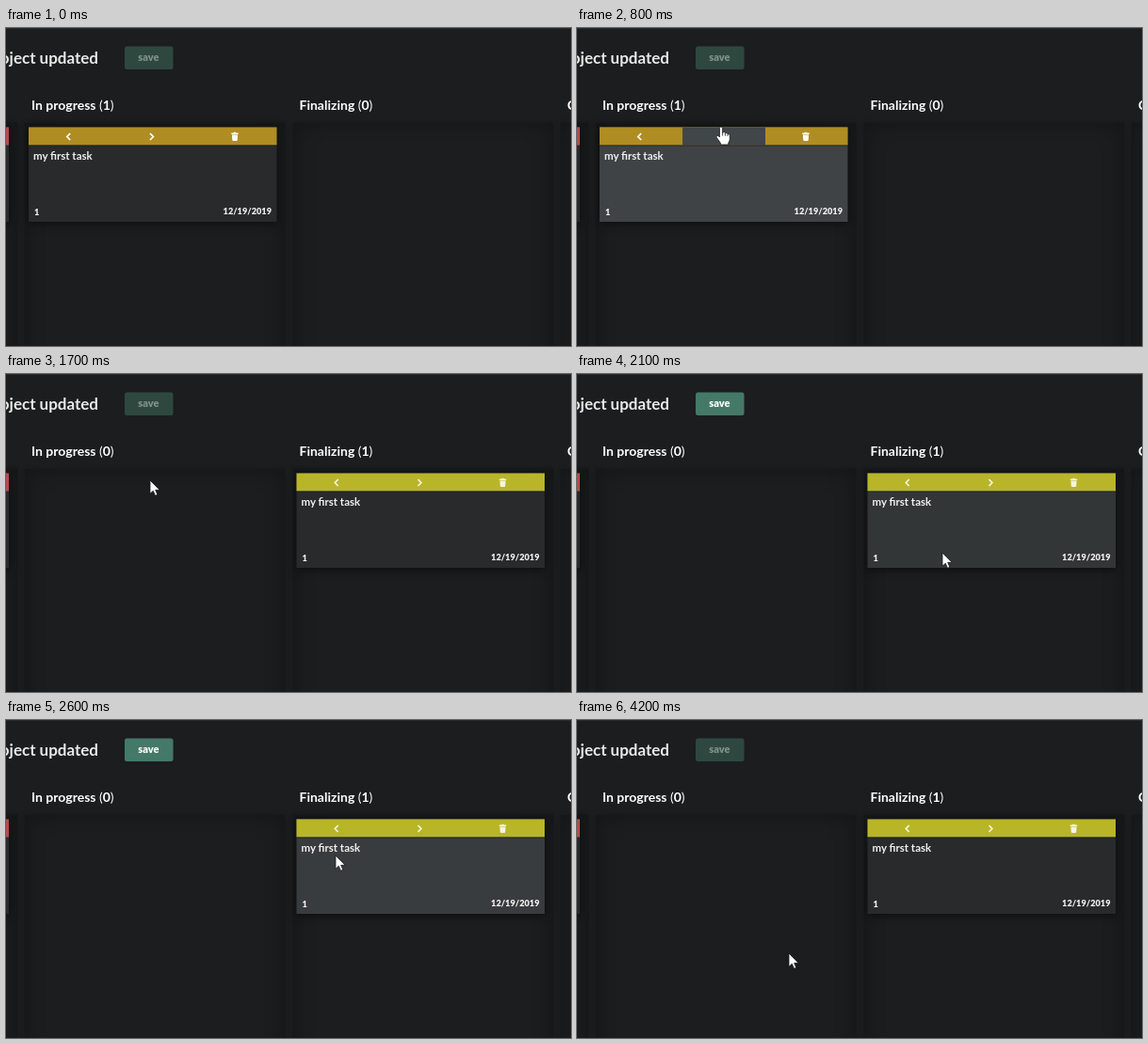
Write an HTML page that moves like this. It is 600 by 338 pixels and loops after 5000 ms.

```html
<!DOCTYPE html>
<html lang="en">
<head>
<meta charset="utf-8">
<title>Task board</title>
<style>
html, body { margin: 0; width: 100%; height: 100%; overflow: hidden; background: #1c1d1e; }
.stage { position: relative; width: 600px; height: 338px; overflow: hidden; border-top: 1px solid #292a2c; box-sizing: border-box; }
.column { position: absolute; top: 100px; width: 276px; height: 300px; background: #1c1d1e; box-shadow: inset 0 0 22px rgba(0, 0, 0, .32), 0 0 4px rgba(0, 0, 0, .25); }
svg { position: absolute; left: 0; top: -1px; }
text { font: 700 14px Lato, sans-serif; fill: #fff; }
.title { font-size: 17px; fill: #e9e9e9; }
.task { font-size: 11.5px; fill: #f0f0f0; }
.small { font-size: 9.2px; font-weight: 900; fill: #f0f0f0; }
.thin { font-weight: 400; }
.body { fill: #292a2b; filter: drop-shadow(0 2px 5px rgba(0, 0, 0, .55)); }
.chevron { fill: none; stroke: #fff; stroke-width: 1.7; }

/* One loop is 5 s, so 2% is one 100 ms step. */
.before, .after, .hover, .arrow, .hand, .pointer, .save, .label, .card .body {
  animation: 5s step-end infinite;
}
.before { animation-name: leave; }
.after { animation-name: arrive; }
.first .body { animation-name: firstBody; }
.second .body { animation-name: secondBody; }
.hover { fill: #414648; opacity: 0; }
.hover.back { animation-name: hoverBack; }
.hover.next { animation-name: hoverNext; }
.save { animation-name: save; }
.label { font-size: 11px; font-weight: 900; animation-name: label; }
.pointer { animation-name: move; }
.arrow { animation-name: arrow; }
.hand { animation-name: hand; }

@keyframes leave { 0% { opacity: 1; } 28%, 100% { opacity: 0; } }
@keyframes arrive { 0% { opacity: 0; } 28%, 100% { opacity: 1; } }
@keyframes firstBody {
  0% { fill: #292a2b; } 6% { fill: #323435; } 8% { fill: #3a3d3f; }
  10% { fill: #3f4345; } 26%, 100% { fill: #292a2b; }
}
@keyframes secondBody {
  0% { fill: #292a2b; } 40% { fill: #2d2e2f; } 42% { fill: #333637; } 44% { fill: #292a2b; }
  50% { fill: #313334; } 52% { fill: #393c3e; } 54% { fill: #303233; } 56%, 100% { fill: #292a2b; }
}
@keyframes hoverBack { 0% { opacity: 0; } 10% { opacity: 1; } 12%, 100% { opacity: 0; } }
@keyframes hoverNext { 0% { opacity: 0; } 12% { opacity: .7; } 14% { opacity: 1; } 26%, 100% { opacity: 0; } }
@keyframes save {
  0% { fill: #2e4840; } 36% { fill: #396154; } 38% { fill: #447968; }
  58% { fill: #4d7067; } 60% { fill: #596667; }
  72% { fill: #435650; } 74%, 100% { fill: #2e4840; }
}
@keyframes label {
  0% { fill: #82918b; } 36% { fill: #c0c9c5; } 38% { fill: #fff; }
  72% { fill: #b3bbb8; } 74%, 100% { fill: #82918b; }
}
@keyframes move {
  0% { transform: translate(62px, 188px); }
  8% { transform: translate(84px, 146px); }
  10% { transform: translate(103px, 108px); }
  12% { transform: translate(130px, 107px); }
  14% { transform: translate(149px, 106px); }
  16% { transform: translate(153px, 105px); }
  30% { transform: translate(153px, 109px); }
  32% { transform: translate(153px, 113px); }
  38% { transform: translate(176px, 120px); }
  40% { transform: translate(262px, 146px); }
  42% { transform: translate(388px, 190px); }
  44% { transform: translate(458px, 214px); }
  50% { transform: translate(425px, 189px); }
  52% { transform: translate(350px, 144px); }
  54% { transform: translate(270px, 102px); }
  56% { transform: translate(205px, 66px); }
  58% { transform: translate(168px, 42px); }
  60% { transform: translate(158px, 35px); }
  62% { transform: translate(157px, 37px); }
  64% { transform: translate(156px, 39px); }
  80% { transform: translate(164px, 66px); }
  82% { transform: translate(192px, 141px); }
  84%, 100% { transform: translate(225px, 248px); }
}
@keyframes arrow {
  0% { opacity: 0; } 6% { opacity: 1; } 10% { opacity: 0; } 26% { opacity: 1; }
  58% { opacity: 0; } 72%, 100% { opacity: 1; }
}
@keyframes hand {
  0% { opacity: 0; } 10% { opacity: 1; } 26% { opacity: 0; }
  58% { opacity: 1; } 72%, 100% { opacity: 0; }
}
</style>
</head>
<body>
<div class="stage">
  <div class="column" style="left:-264.5px"></div>
  <div class="column" style="left:20px"></div>
  <div class="column" style="left:304.5px"></div>
  <div class="column" style="left:589px"></div>
  <svg width="600" height="338" viewBox="0 0 600 338">
    <defs>
      <g id="icons">
        <path class="chevron" d="M68.2 112l-3.4 3.5 3.4 3.5M153 112l3.4 3.5-3.4 3.5"/>
        <path fill="#fff" d="M239.3 111.5h2.2l.6-.8h1.8l.6.8h2.2v1.4h-7.4zM239.9 113.4h6.2l-.4 5.7q-.1.9-1 .9h-3.4q-.9 0-1-.9z"/>
      </g>
      <g id="details">
        <text class="task" x="29" y="140">my first task</text>
        <text class="small" x="30" y="199">1</text>
        <text class="small" x="282" y="197.5" text-anchor="end">12/19/2019</text>
      </g>
    </defs>

    <text class="title" x="98" y="38" text-anchor="end">project updated</text>
    <rect class="save" x="126" y="19.5" width="51.5" height="24.5" rx="2.5"/>
    <text class="label" x="151.3" y="35" text-anchor="middle">save</text>

    <g class="before">
      <text x="27" y="87">In progress <tspan class="thin">(</tspan>1<tspan class="thin">)</tspan></text>
      <text x="311.5" y="87">Finalizing <tspan class="thin">(</tspan>0<tspan class="thin">)</tspan></text>
    </g>
    <g class="after">
      <text x="27" y="87">In progress <tspan class="thin">(</tspan>0<tspan class="thin">)</tspan></text>
      <text x="311.5" y="87">Finalizing <tspan class="thin">(</tspan>1<tspan class="thin">)</tspan></text>
    </g>
    <text x="596" y="87">Completed (0)</text>

    <rect class="body" x="-260" y="105" width="263" height="101"/>
    <rect x="-260" y="105.5" width="263" height="19" fill="#b34c4a"/>

    <g class="before">
      <g class="card first">
        <rect class="body" x="24" y="105" width="263.5" height="101"/>
        <rect x="24" y="105.5" width="263.5" height="19" fill="#b08d22"/>
        <rect class="hover back" x="24" y="105.5" width="88" height="19"/>
        <rect class="hover next" x="112" y="105.5" width="88" height="19"/>
        <rect x="24" y="124.5" width="263.5" height="1" fill="#1c1d1e" opacity=".7"/>
        <use href="#icons"/>
        <use href="#details"/>
      </g>
    </g>
    <g class="after">
      <g class="card second" transform="translate(284.5 0)">
        <rect class="body" x="24" y="105" width="263.5" height="101"/>
        <rect x="24" y="105.5" width="263.5" height="19" fill="#b9b529"/>
        <rect x="24" y="124.5" width="263.5" height="1" fill="#1c1d1e" opacity=".7"/>
        <use href="#icons" opacity=".85"/>
        <use href="#details"/>
      </g>
    </g>

    <g class="pointer" fill="#fff" stroke="#151515" stroke-width=".8" stroke-linejoin="round">
      <path class="arrow" d="M0 0V14.2L3.3 11.2 5.5 16.3 7.9 15.3 5.7 10.3H10.2Z"/>
      <g class="hand">
        <path d="M-1.6 1.3Q-1.5 0 0 0T1.6 1.3V6Q3.6 5 4.4 6.6 6.2 5.8 7 7.4 9.3 6.8 9.3 9.4V13Q9.3 15.2 7.8 17V19H-.6V17.3L-4.6 11.6Q-5.5 10-4.2 9.4-3 9-1.6 11Z"/>
        <path fill="none" d="M1.6 6V9.5M4.4 6.6V9.7M7 7.4V10"/>
      </g>
    </g>
  </svg>
</div>
</body>
</html>
```
